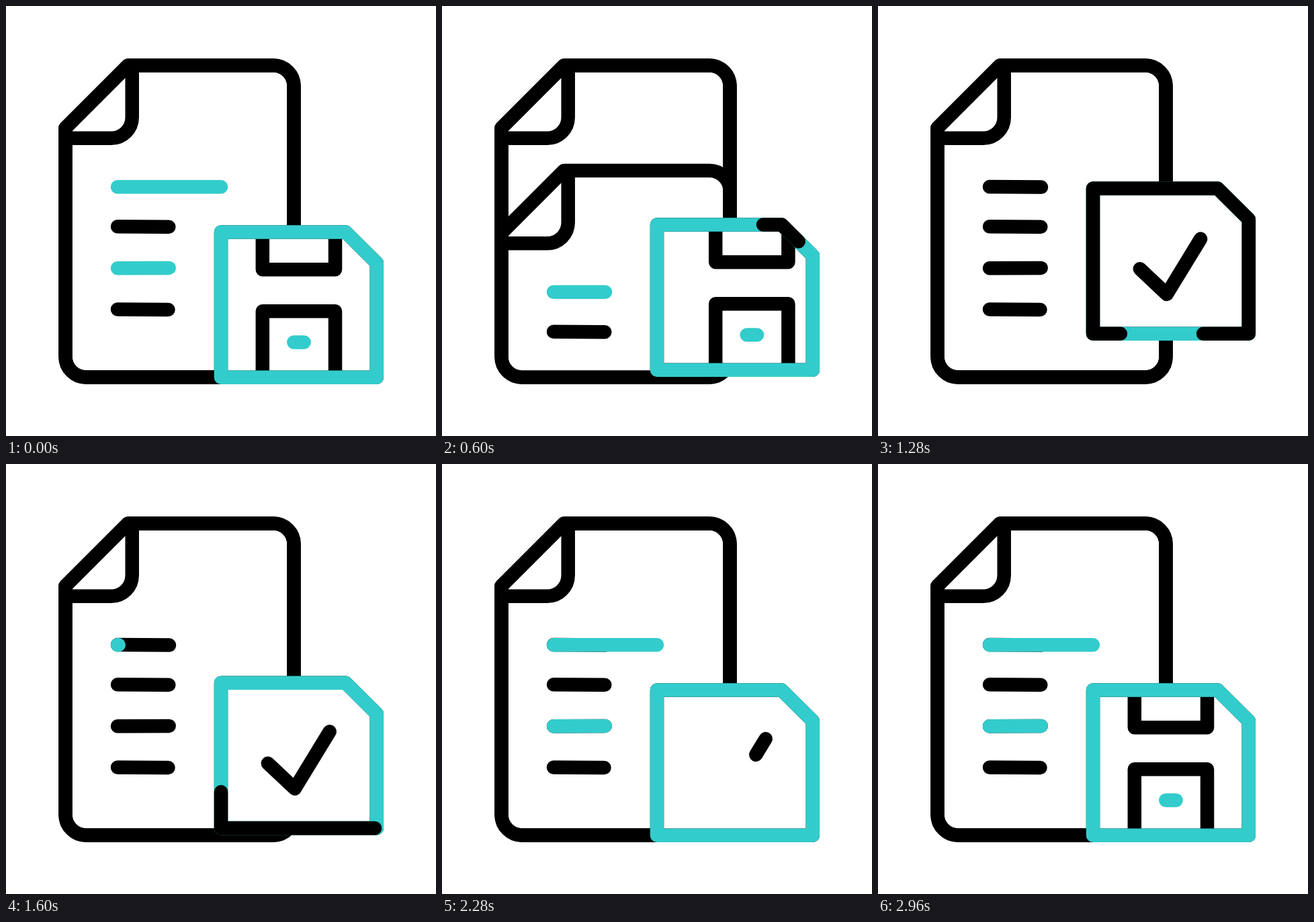
Animation of 640 by 640 pixels, one loop 3000 ms. Source, as an HTML page:

```html
<!DOCTYPE html>
<html lang="en">
<head>
<meta charset="utf-8">
<title>Save file</title>
<style>
  html, body { margin: 0; width: 100%; height: 100%; overflow: hidden; background: #fff; }
  svg { display: block; width: 100%; height: 100%; }
  .s { fill: none; stroke: #000; stroke-width: 20.5; stroke-linecap: round; stroke-linejoin: round; }
  .t { stroke: #33cccc; }
  .w { fill: #fff; }
</style>
</head>
<body>
<svg viewBox="0 0 640 640">
  <defs>
    <path id="doc" d="M181.5 88.5H398A30.5 30.5 0 0 1 428.5 119V522A30.5 30.5 0 0 1 398 552.5H119A30.5 30.5 0 0 1 88.5 522V181.5Z"/>
    <path id="fold" d="M187.7 90V165.8A31 31 0 0 1 156.7 196.8H90"/>
    <path id="disk" d="M320 336.5H505.5L551.8 382.5V552.8H320Z"/>
    <clipPath id="inDoc"><use href="#doc"/></clipPath>
    <clipPath id="inDisk"><use href="#disk"/></clipPath>
    <clipPath id="inText"><path d="M89 89H428V533H89Z"/></clipPath>
  </defs>

  <g class="s">
    <use href="#doc" class="w"/>
    <use href="#fold"/>
    <path class="row" d="M166 269L243 269.6"/>
    <path class="row" d="M166 328.3L242.3 328.8"/>
    <path class="row" d="M166 390.2L242.7 389.9"/>
    <path class="row" d="M166 451.6L241.5 452"/>
    <path id="long" class="t" d="M166 269.2H320"/>
    <path id="short" class="t" d="M166 390.2L242.7 389.9"/>
  </g>

  <g id="old" class="s">
    <g clip-path="url(#inDoc)">
      <g class="slide">
        <use href="#doc" class="w"/>
        <use href="#fold"/>
      </g>
    </g>
    <g clip-path="url(#inText)">
      <g class="slide">
        <path id="oldLong" class="t" d="M166 269.2H320"/>
        <path d="M166 328.3L242.3 328.8"/>
        <path class="t" d="M166 390.2L242.7 389.9"/>
        <path d="M166 451.6L241.5 452"/>
      </g>
    </g>
  </g>
  <use href="#doc" class="s"/>

  <g id="card" class="s">
    <use href="#disk" class="w"/>
    <g clip-path="url(#inDisk)">
      <g id="parts">
        <path d="M381.8 336V392.2H490V336M381.8 556V454.3H490V556"/>
        <path class="t" d="M428.3 500.5H443.6"/>
      </g>
    </g>
    <path id="check" d="M389.8 456.3L429.8 494L481.7 409"/>
    <use href="#disk" class="t"/>
    <use href="#disk" id="trail"/>
  </g>
</svg>
<script>
const LOOP = 3000, STEP = 40;
const $ = id => document.getElementById(id);
const rows = [...document.querySelectorAll('.row')];
const slides = [...document.querySelectorAll('.slide')];
const perimeter = $('disk').getTotalLength();
const checkLen = $('check').getTotalLength();

// Eased progress from time a to time b
const ease = (t, a, b) => {
  const x = Math.min(1, Math.max(0, (t - a) / (b - a)));
  return x * x * (3 - 2 * x);
};

// Value on a line through [time, value] points
const along = (t, pts) => {
  if (t <= pts[0][0]) return pts[0][1];
  const i = pts.findIndex(p => p[0] >= t);
  if (i < 0) return pts[pts.length - 1][1];
  const [a, u] = pts[i - 1], [b, v] = pts[i];
  return u + (v - u) * (t - a) / (b - a);
};

const show = (el, on) => el.setAttribute('visibility', on ? 'visible' : 'hidden');
const move = (el, x, y) => el.setAttribute('transform', `translate(${x} ${y})`);

// Show only the stretch from a to b of a path
const trim = (el, a, b, gap = 2000) => {
  show(el, b - a > 0.05);
  el.setAttribute('stroke-dasharray', `${Math.max(0, b - a)} ${gap}`);
  el.setAttribute('stroke-dashoffset', -a);
};

const turn = [[500, 118], [600, 158], [960, 339], [1280, 522], [1600, 705], [2040, 985]];
const head = [[530, 0], [600, 63], [780, 330], [960, 558], [1120, 725], [1280, 836], [1440, 871]];
const tail = [[1120, 0], [1200, 35], [1280, 90], [1440, 340], [1600, 588], [1760, 745], [1900, 830], [2040, 871]];

function draw(t) {
  // Page slides out, new rows are written
  const drop = 484 * ease(t, 393, 938);
  slides.forEach(g => move(g, 0, drop));
  $('old').setAttribute('display', t < 940 ? 'inline' : 'none');
  trim($('oldLong'), 0, 154 - 77 * ease(t, 300, 560));
  rows.forEach((r, i) => {
    const s = 462 + 35 * i;
    trim(r, 0, 77 * ease(t, s, s + 600));
  });
  trim($('long'), 0, 154 * ease(t, 1560, 2200));
  trim($('short'), 0, 77 * ease(t, 1620, 2240));

  // Disk lifts, swaps its parts for a check mark and returns
  move($('card'), 0, -65 * (ease(t, 460, 997) - ease(t, 1300, 1705)));
  const shift = t < 1500 ? 175 * ease(t, 480, 980) : -175 * (1 - ease(t, 2360, 2960));
  move($('parts'), shift, 0);
  trim($('check'), checkLen * ease(t, 1820, 2450), checkLen * ease(t, 701, 1332));

  // Dark stroke runs round the outline
  const o = along(t, turn), a = along(t, tail), b = along(t, head);
  trim($('trail'), (o + a) % perimeter, (o + a) % perimeter + b - a, perimeter - (b - a));
}

function tick() {
  const t = performance.now() % LOOP;
  draw(Math.floor(t / STEP) * STEP);
  requestAnimationFrame(tick);
}
tick();
</script>
</body>
</html>
```
